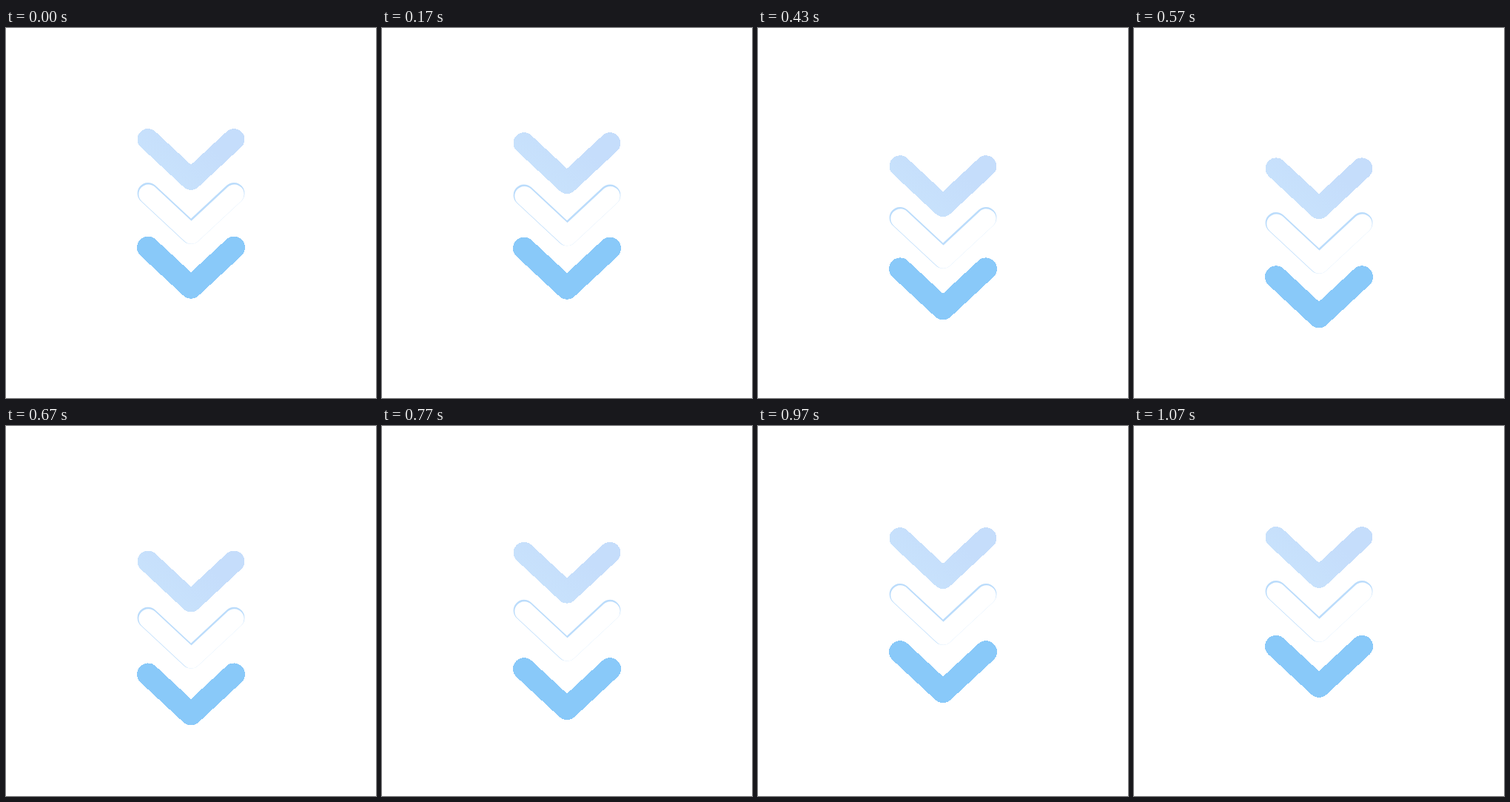
An HTML page for the animation above (1.11 s loop, 500x500 px).

```html
<!DOCTYPE html>
<html lang="en">
<head>
<meta charset="utf-8">
<title>Scroll down chevrons</title>
<style>
  html, body { margin: 0; width: 100%; height: 100%; overflow: hidden; background: #fff; }
  svg { display: block; width: 100vw; height: 100vh; }
  path { fill: none; stroke-linecap: round; stroke-linejoin: round; }
  .crisp { shape-rendering: crispEdges; }
</style>
</head>
<body>
<svg viewBox="0 0 500 500">
  <defs>
    <linearGradient id="pale" gradientUnits="userSpaceOnUse" x1="215" y1="205" x2="265" y2="150">
      <stop offset="0" stop-color="#c8e2fc"/>
      <stop offset="1" stop-color="#c5ddfb"/>
    </linearGradient>
  </defs>
  <g class="chevron">
    <path class="crisp" d="M192 150.5l58 54l58-54" stroke="url(#pale)" stroke-width="28.8"/>
  </g>
  <g class="chevron">
    <path d="M192 223.4l58 54l58-54" stroke="#bbdcfb" stroke-width="28.8"/>
    <path d="M192.5 224.6l58 54l58-54" stroke="#fff" stroke-width="26.4"/>
  </g>
  <g class="chevron">
    <path class="crisp" d="M192 296.7l58 54l58-54" stroke="#89c9f9" stroke-width="30"/>
  </g>
</svg>
<script>
  const LOOP = 1110, HOLD = 100, STEP = 100 / 3, LAST = 29, DROP = 40;

  // Times in ms: fall starts, fall ends, rise starts, rise ends
  const timing = [
    [63, 522, 529, 1022],
    [96, 557, 562, 1074],
    [122, 600, 613, 1126]
  ];
  const chevrons = document.querySelectorAll('.chevron');

  function ease(t, from, to) {
    const p = Math.min(1, Math.max(0, (t - from) / (to - from)));
    return (1 - Math.cos(Math.PI * p)) / 2;
  }

  // Rest at first, then advance at 30 steps a second
  function stepTime(t) {
    if (t < HOLD) return 0;
    const k = Math.min(LAST, Math.floor((t - HOLD + 3.4) / STEP));
    return Math.round((HOLD + k * STEP) / 10) * 10;
  }

  function draw(now) {
    const t = stepTime(now % LOOP);
    timing.forEach(([a, b, c, d], i) => {
      const y = DROP * (ease(t, a, b) - ease(t, c, d));
      chevrons[i].setAttribute('transform', `translate(0 ${y.toFixed(2)})`);
    });
  }

  const start = performance.now();
  function tick() {
    draw(performance.now() - start);
    requestAnimationFrame(tick);
  }
  tick();
</script>
</body>
</html>
```
